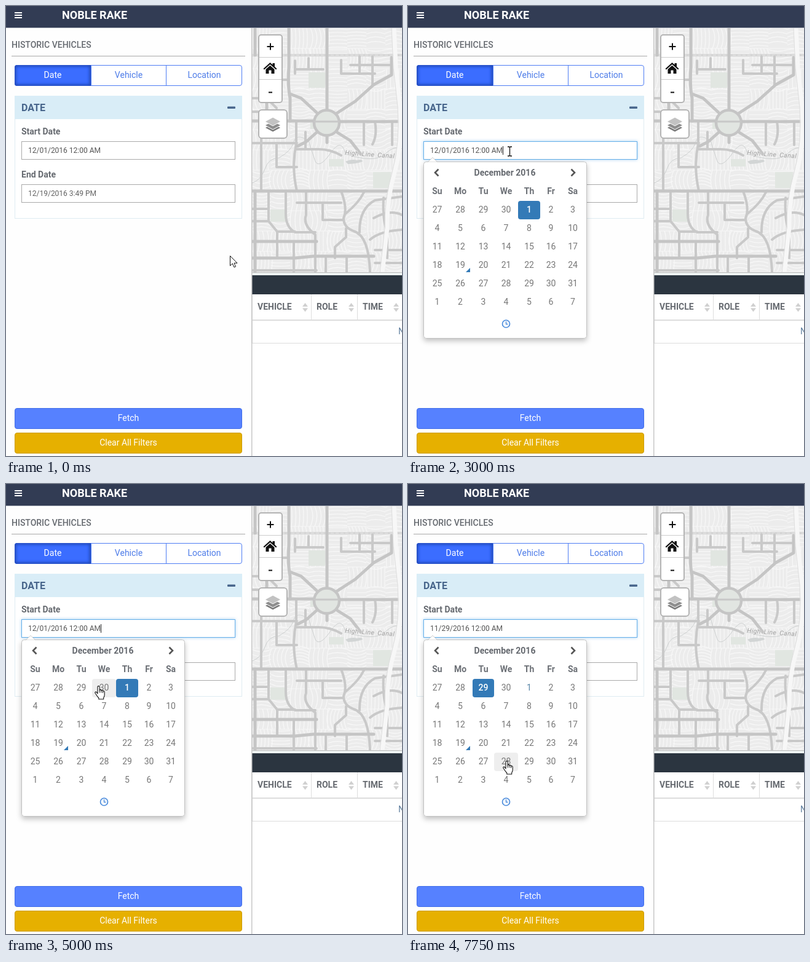
Recreate the animation shown at these times as an HTML page. Size 644x732 px, loop 8000 ms.

```html
<!DOCTYPE html>
<html lang="en">
<head>
<meta charset="utf-8">
<title>Vehicle history filter</title>
<style>
  html, body { margin: 0; width: 100%; height: 100%; overflow: hidden; background: #fff; }
  svg { display: block; width: 644px; height: 732px; font-family: Roboto, Arial, sans-serif; }
  text { white-space: pre; }
</style>
</head>
<body>
<svg id="stage" viewBox="0 0 644 732" width="644" height="732"></svg>
<script>
const LOOP = 8000, STEP = 250;
const COLS = [30, 66, 105, 140, 179, 215, 250, 286];
const MIDS = [47.5, 85, 122.5, 159.5, 197, 232.5, 268];

// Markup helpers
const rect = (x, y, w, h, fill, more = '') =>
  `<rect x="${x}" y="${y}" width="${w}" height="${h}" fill="${fill}" ${more}/>`;
const box = (x, y, w, h, fill, stroke, r = 0, more = '') =>
  rect(x + .5, y + .5, w - 1, h - 1, fill, `stroke="${stroke}" rx="${r}" ${more}`);
const label = (x, y, str, size, fill, weight = 400, more = '') =>
  `<text x="${x}" y="${y}" font-size="${size}" fill="${fill}" font-weight="${weight}" ${more}>${str}</text>`;
const centred = (x, y, str, size, fill, weight = 400, more = '') =>
  label(x, y, str, size, fill, weight, `text-anchor="middle" ${more}`);
const shape = (d, fill, more = '') => `<path d="${d}" fill="${fill}" ${more}/>`;
const line = (d, stroke, width, more = '') =>
  `<path d="${d}" fill="none" stroke="${stroke}" stroke-width="${width}" ${more}/>`;

function random(seed) {
  return () => (seed = (seed * 16807) % 2147483647) / 2147483647;
}

// Residential streets: tiles of bent parallel lines
function streets() {
  const rnd = random(4177);
  let d = '';
  for (let y = 36; y < 436; y += 33) {
    for (let x = 400; x < 644; x += 31) {
      const upright = rnd() < .52, bend = (rnd() - .5) * 20, gap = 5 + rnd() * 3;
      for (let k = 2; k < 32; k += gap) {
        d += upright
          ? `M${x + k} ${y}q${bend} 16 0 33`
          : `M${x} ${y + k}q15 ${bend} 31 0`;
      }
      d += `M${x} ${y}h31`;
    }
  }
  return d;
}

function map() {
  const avenues = [
    'M400 187H501M542 188H644M400 301H644M522 36V169M522 211V222M400 410H470L500 407H598M400 383H505',
    'M460 36V100Q458 130 462 150V187M405 36V80M405 301V433M424 120V187',
    'M537 175L568 155L598 128L627 112V84M536 204L560 219L577 241M507 204L488 221L474 228M507 175L480 150L462 143'
  ];
  const locals = [
    'M470 103H516M470 89V110M492 85V103M545 88V110H600M560 96H627M575 82V110M596 82V128M400 150H424L440 166M400 172H412M413 120H460',
    'M472 188V224Q464 262 473 301M473 233H505Q526 232 545 243M487 205V233M582 188V226M600 188Q604 210 596 225M628 188V226M400 223H473M415 187V300M440 224V262H473',
    'M473 320H545M455 301V338Q455 360 470 368H503M488 301V340Q482 356 503 372V433M545 301Q556 330 549 345Q549 360 565 366Q590 373 592 433',
    'M552 338Q574 320 582 303M575 368Q574 330 600 316L644 310M592 380Q608 366 644 364M614 312Q612 350 620 366V410M598 345Q625 330 644 340M535 410V392L553 376V362',
    'M427 301V350H400M427 350L441 367H470M441 367V410M468 383V433M400 430H505M520 410V433M554 410V433M600 397H644M600 418H644M515 320V348H549M400 330H427'
  ];
  const parks = [[492, 108, 27, 25], [525, 249, 24, 12], [597, 270, 29, 26], [430, 331, 25, 20], [495, 190, 12, 10]];
  const road = (d, w, c) => line(d, c, w, 'stroke-linejoin="round" stroke-linecap="round"');
  return `<g clip-path="url(#mapClip)">
    ${rect(400, 36, 244, 398, '#ececec')}
    ${line(streets(), '#f8f8f8', 1.2)}
    ${parks.map(p => rect(...p, '#e1e6e1')).join('')}
    ${line('M400 288Q415 283 421 265T444 247Q464 236 468 221T492 219L503 253Q510 265 528 239T552 241Q600 256 616 241T644 232', '#cdd0d0', 1)}
    ${road('M400 80H644', 4, '#d6d6d6')}${line('M400 80H644', '#e8e8e8', 1, 'stroke-dasharray="5 3"')}
    ${locals.map(d => road(d, 4, '#c9c9c9')).join('')}
    ${avenues.map(d => road(d, 5, '#c5c5c5')).join('')}
    <circle cx="521.5" cy="190" r="20.5" fill="#e1e5e1" stroke="#c5c5c5" stroke-width="4.5"/>
    ${line('M501 188H542', '#c8c8c8', 3)}
    ${road('M631 36L634 100L641 165Q645 225 632 270T620 360L612 434', 7, '#f7f7f7')}
    ${line('M627 36L630 100L637 165Q641 225 628 270T616 360L608 434', '#dedede', 1)}
    ${shape('M552 253q10-5 19-2q8-3 9 2q-11 4-24 4z', '#d2d5d5')}
    ${label(551, 242, 'High Line Canal', 10.5, '#a0a0a0', 400, 'font-style="italic" letter-spacing=".4" word-spacing="2" stroke="#eee" stroke-width="1.5" paint-order="stroke" transform="rotate(4 551 242)"')}
  </g>`;
}

function mapButtons() {
  const frame = 'stroke-width="2"';
  const sheet = (y, fill) => shape(`M434 ${y - 7}l13 7l-13 7l-13-7z`, fill, 'stroke="#fff" stroke-width="1"');
  return rect(411, 47, 38, 110, '#fff', `rx="4" stroke="#b4b4b4" ${frame}`) +
    line('M412 83.5H448M412 119.5H448', '#ccc', 1) +
    line('M424.5 66H435.5M430 60.5V71.5', '#111', 2) +
    line('M427 140.5H433', '#111', 2) +
    shape('M418.5 102L429.5 92L433.5 95.6V93H437V98.8L440.5 102L439 103.5L429.5 95L420 103.5Z', '#111') +
    shape('M422.5 103L429.5 96.8L436.5 103V110H431.5V104.5H427.5V110H422.5Z', '#111') +
    rect(411, 169, 46, 46, '#fff', `rx="5" stroke="#b4b4b4" ${frame}`) +
    sheet(198, '#7c7c7c') + sheet(194, '#8e8e8e') + sheet(188, '#c2c2c2');
}

function table() {
  const heads = [[409, 'VEHICLE', 486.5], [505, 'ROLE', 561.5], [580, 'TIME', 634.5]];
  return rect(400, 433, 244, 1, '#b9b9b9') + rect(400, 434, 244, 4, '#eef3f2') +
    rect(400, 438, 244, 31, '#2b3540') + rect(400, 469, 244, 263, '#fff') +
    line('M400.5 469V548M496.5 469V510M571.5 469V510M400 548.5H644', '#ddd', 1) +
    rect(400, 510, 244, 2, '#ddd') +
    heads.map(([x, str, s]) => label(x, 494, str, 14, '#666a70', 700) +
      shape(`M${s - 4.5} 489l4.5-6l4.5 6zM${s - 4.5} 491.5l4.5 6l4.5-6z`, '#d0d0d0')).join('') +
    label(638, 534, 'No data', 14, '#5f7f9f');
}

function sidebar() {
  const field = (y, name) => label(25, y - 11, name, 14, '#666a70', 700) + box(25, y, 348, 30, '#fff', '#aaa');
  const button = (y, name, fill, edge) => box(14, y, 370, 34, fill, edge, 3.5) + centred(199, y + 21, name, 14, '#fff');
  return rect(0, 36, 400, 696, '#fefefe') +
    label(9, 68, 'HISTORIC VEHICLES', 14, '#666a70', 500) + rect(9, 81, 380, 1, '#a9a9a9') +
    box(14, 96, 370, 34, '#fff', '#4f7df3', 3.5) +
    line('M138.5 96V130M260.5 96V130', '#4f7df3', 1) +
    `<g clip-path="url(#tabClip)">${rect(14, 96, 124, 34, '#3b6dff')}
      ${line('M14 96H138V130H14Z', '#1d41a8', 5, 'filter="url(#blur)" opacity=".85"')}</g>` +
    centred(76, 117, 'Date', 14, '#fff') +
    centred(199.5, 117, 'Vehicle', 14, '#4f7de8') + centred(322.5, 117, 'Location', 14, '#4f7de8') +
    box(14, 146, 370, 200, '#fff', '#dfecf2') + rect(14, 146, 370, 38, '#d9edf7') +
    label(25, 171, 'DATE', 16, '#48668c', 700) + rect(360, 163.5, 13, 3.5, '#48668c', 'rx="1"') +
    field(220, 'Start Date') + field(290, 'End Date') + label(36, 309, '12/19/2016 3:49 PM', 12, '#626262') +
    button(654, 'Fetch', '#5681ff', '#406de8') + button(694, 'Clear All Filters', '#e6b000', '#cc9b00') +
    rect(399, 36, 1.5, 696, '#c8c8c8');
}

const header = () => rect(0, 0, 644, 35, '#323c54') + rect(0, 35, 644, 1, '#a4a9b4') +
  [10, 14, 18].map(y => rect(14, y, 12, 2, '#fff')).join('') +
  label(91, 21, 'NOBLE RAKE', 18, '#fff', 700);

const dayNumber = i => i < 4 ? 27 + i : i < 35 ? i - 3 : i - 34;

function calendar(picked, hover) {
  const cell = (i, fill) => {
    const c = i % 7;
    return rect(COLS[c], 317 + Math.floor(i / 7) * 30, COLS[c + 1] - COLS[c], 30, fill, 'rx="4"');
  };
  let out = box(25, 253, 266, 288, '#fff', '#c2c2c2', 4, 'filter="url(#shadow)"') +
    shape('M33 253.5L40 246.5L47 253.5Z', '#fff') + line('M33 253L40 246.5L47 253', '#ccc', 1) +
    centred(157.5, 276, 'December 2016', 14, '#666a70', 700) +
    line('M49.5 265.5L44 271L49.5 276.5M265.5 265.5L271 271L265.5 276.5', '#555', 2.6);
  if (hover >= 0 && hover !== picked) out += cell(hover, '#eee');
  out += cell(picked, '#337ab7');
  ['Su', 'Mo', 'Tu', 'We', 'Th', 'Fr', 'Sa'].forEach((d, i) => out += centred(MIDS[i], 306, d, 14, '#6c7076', 700));
  for (let i = 0; i < 42; i++) {
    const on = i === picked;
    const fill = on ? '#fff' : i === 4 ? '#5b88a8' : '#777';
    out += centred(MIDS[i % 7], 336 + Math.floor(i / 7) * 30, dayNumber(i), 14, fill, on ? 500 : 400);
  }
  return out + shape('M101 426V433H94Z', '#337ab7') +
    '<circle cx="159.5" cy="517" r="6" fill="none" stroke="#4a8bdc" stroke-width="1.7"/>' +
    line('M159.5 513V517.5H162.5', '#4a8bdc', 1.3);
}

// Pointer shapes, each drawn from its top-left corner (the beam from its centre)
const BEAM = 'M-3.5 -7.5H-1L0 -6.5L1 -7.5H3.5M0 -6.5V6.5M-3.5 7.5H-1L0 6.5L1 7.5H3.5';
const pointers = {
  arrow: shape('M.5 .5V16.5L4.3 13L7 19L9.5 18L7 12.2H12Z', '#fff', 'stroke="#111" stroke-linejoin="round"'),
  beam: line(BEAM, '#fff', 2.6) + line(BEAM, '#111', 1.3),
  hand: shape('M5 13V2.2Q5 .6 6.6 .6T8.2 2.2V7.5Q8.5 6.5 9.7 6.6T11 8Q11.4 7.2 12.5 7.4T13.6 9Q14.2 8.3 15.2 8.7T16.2 10.3V15Q16.2 17.5 14.7 19.5V22H6.8V20Q4 17 2.8 14.7L.9 12Q.4 10.8 1.5 10.3T3.5 11.2Z',
    '#fff', 'stroke="#111" stroke-width="1.1" stroke-linejoin="round"') +
    line('M8.2 7.5V11.5M11 8V11.5M13.6 9V12', '#111', 1)
};

// time, pointer, x, y
const moves = [
  [0, 'arrow', 364, 406], [250, 'arrow', 345, 380], [500, 'arrow', 304, 333],
  [750, 'arrow', 254, 286], [1000, 'arrow', 216, 258], [1250, 'beam', 194, 245],
  [1500, 'beam', 182, 241], [1750, 'beam', 171, 238], [2000, 'beam', 165.5, 236.5],
  [3500, 'beam', 178, 273], [3750, 'beam', 191.5, 310.5], [4000, 'hand', 233, 326],
  [4250, 'hand', 66, 325], [4500, 'hand', 167, 326], [4750, 'hand', 155, 327],
  [5000, 'hand', 144, 328], [5250, 'hand', 129, 329], [5500, 'hand', 114, 330],
  [6750, 'hand', 117, 338], [7000, 'hand', 124, 363], [7250, 'hand', 137, 400],
  [7500, 'hand', 149, 434], [7750, 'hand', 154, 450]
];

function hoveredDay(kind, x, y) {
  if (kind !== 'hand') return -1;
  const col = COLS.findIndex((left, i) => x + 6 >= left && x + 6 < COLS[i + 1]);
  return Math.floor((y - 316) / 30) * 7 + col;
}

function caretOn(t) {
  const since = t < 6250 ? t - 3000 : t - 6250;
  return Math.floor(since / 500) % 2 === 0;
}

const stage = document.getElementById('stage');
stage.innerHTML = `<defs>
  <clipPath id="mapClip"><rect x="400" y="36" width="244" height="397"/></clipPath>
  <clipPath id="tabClip"><path d="M18 96H138V130H18Q14 130 14 126V100Q14 96 18 96Z"/></clipPath>
  <filter id="blur" x="-10%" y="-30%" width="120%" height="160%"><feGaussianBlur stdDeviation="2.2"/></filter>
  <filter id="glow" x="-5%" y="-50%" width="110%" height="200%"><feDropShadow dx="0" dy="0" stdDeviation="2.5" flood-color="#66afe9" flood-opacity=".6"/></filter>
  <filter id="shadow" x="-10%" y="-10%" width="120%" height="120%"><feDropShadow dx="0" dy="4" stdDeviation="4" flood-color="#000" flood-opacity=".24"/></filter>
</defs>` + map() + mapButtons() + table() + sidebar() + header() + '<g id="live"></g>';
const live = document.getElementById('live');

function draw(t) {
  const [, kind, x, y] = moves.filter(m => m[0] <= t).pop();
  const open = t >= 3000, changed = t >= 6250;
  let out = '';
  if (open) out += box(25, 220, 348, 30, '#fff', '#66afe9', 0, 'filter="url(#glow)"');
  out += label(36, 239, (changed ? '11/29' : '12/01') + '/2016 12:00 AM', 12, '#555');
  if (open) {
    if (caretOn(t)) out += rect(154, 228, 1, 14, '#222');
    out += calendar(changed ? 2 : 4, hoveredDay(kind, x, y));
  }
  live.innerHTML = out + `<g transform="translate(${x} ${y})">${pointers[kind]}</g>`;
}

const start = performance.now();
let shown = -1;
function tick() {
  const t = Math.floor(((performance.now() - start) % LOOP) / STEP) * STEP;
  if (t !== shown) draw(shown = t);
  requestAnimationFrame(tick);
}
tick();
</script>
</body>
</html>
```
